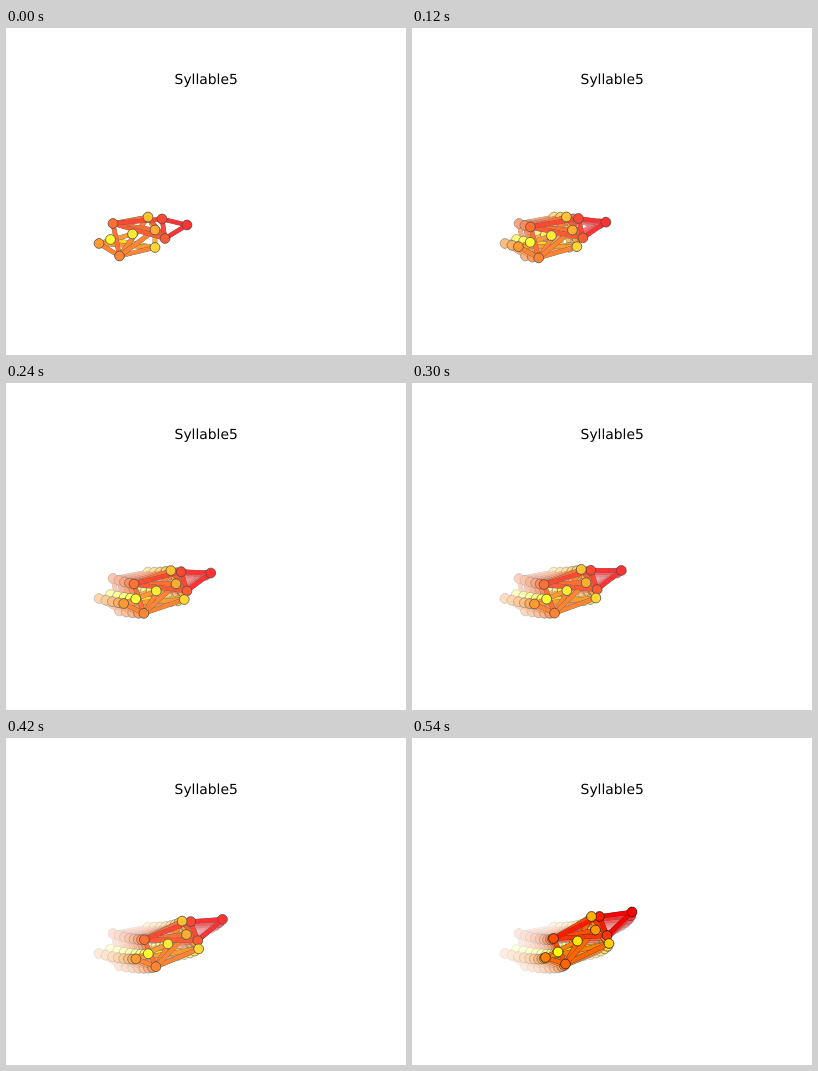
Animation of 400 by 327 pixels, one loop 600 ms. Source, as an HTML page with a canvas:

```html
<!DOCTYPE html>
<html lang="en">
<head>
<meta charset="utf-8">
<title>Syllable5</title>
<style>
  html, body { margin: 0; width: 100%; height: 100%; overflow: hidden; background: #fff; }
  canvas { display: block; }
</style>
</head>
<body>
<canvas id="stage" width="400" height="327"></canvas>
<script>
const ctx = document.getElementById('stage').getContext('2d');
const STEP = 60, STEPS = 10, SAG = 3.3;

// Where each joint starts and ends, from red to yellow
const joints = [
  { from: [181, 197],     to: [220, 174] },
  { from: [156, 191],     to: [187.5, 178.5] },
  { from: [159, 210.5],   to: [195, 197.5] },
  { from: [107, 195.5],   to: [141.5, 200.5] },
  { from: [113.5, 228],   to: [153.5, 226] },
  { from: [93, 215.5],    to: [133.5, 219.5] },
  { from: [149, 202],     to: [183.5, 192] },
  { from: [142, 189],     to: [179.5, 178.5] },
  { from: [149, 219.5],   to: [197, 205.5] },
  { from: [126.5, 206],   to: [165.5, 203] },
  { from: [104.5, 211.5], to: [146, 214] }
];

// Each pair of hex digits joins two joints; later bones lie on top
const bones = '8a 68 67 59 58 48 47 46 45 37 36 34 27 23 13 12 02 01'
  .split(' ').map(pair => [...pair].map(digit => parseInt(digit, 16)));

const color = joint => `rgb(255 ${joint * 25.5} 0)`;

// Joints slow down sideways while their height follows a shallow arc
function poseAt(u) {
  const ease = 1 - (1 - u) ** 1.6;
  return joints.map(({ from: [x0, y0], to: [x1, y1] }) => [
    x0 + (x1 - x0) * ease,
    y0 + (y1 - y0) * u + SAG * 4 * u * (1 - u)
  ]);
}

function drawBone([x0, y0], [x1, y1], width, style) {
  ctx.lineWidth = width;
  ctx.strokeStyle = style;
  ctx.beginPath();
  ctx.moveTo(x0, y0);
  ctx.lineTo(x1, y1);
  ctx.stroke();
}

function drawPose(points) {
  for (const [a, b] of bones) {
    drawBone(points[a], points[b], 4.7, '#333');
    drawBone(points[a], points[b], 4.2, color(a));
  }
  ctx.strokeStyle = '#1a1a1a';
  ctx.lineWidth = 0.75;
  points.forEach(([x, y], joint) => {
    ctx.fillStyle = color(joint);
    ctx.beginPath();
    ctx.arc(x, y, 4.9, 0, 2 * Math.PI);
    ctx.fill();
    ctx.stroke();
  });
}

function veil(alpha) {
  ctx.fillStyle = `rgb(255 255 255 / ${alpha})`;
  ctx.fillRect(0, 0, 400, 327);
}

function render() {
  const current = Math.floor(performance.now() / STEP) % STEPS;
  veil(1);
  // Every pose but the final one is veiled, so older poses fade
  for (let step = 0; step <= current; step++) {
    drawPose(poseAt(step / (STEPS - 1)));
    if (step < STEPS - 1) veil(0.2);
  }
  ctx.fillStyle = '#000';
  ctx.font = '13.89px "DejaVu Sans", sans-serif';
  ctx.textRendering = 'geometricPrecision';
  ctx.textAlign = 'center';
  ctx.fillText('Syllable5', 200.2, 56);
  requestAnimationFrame(render);
}
render();
</script>
</body>
</html>
```
